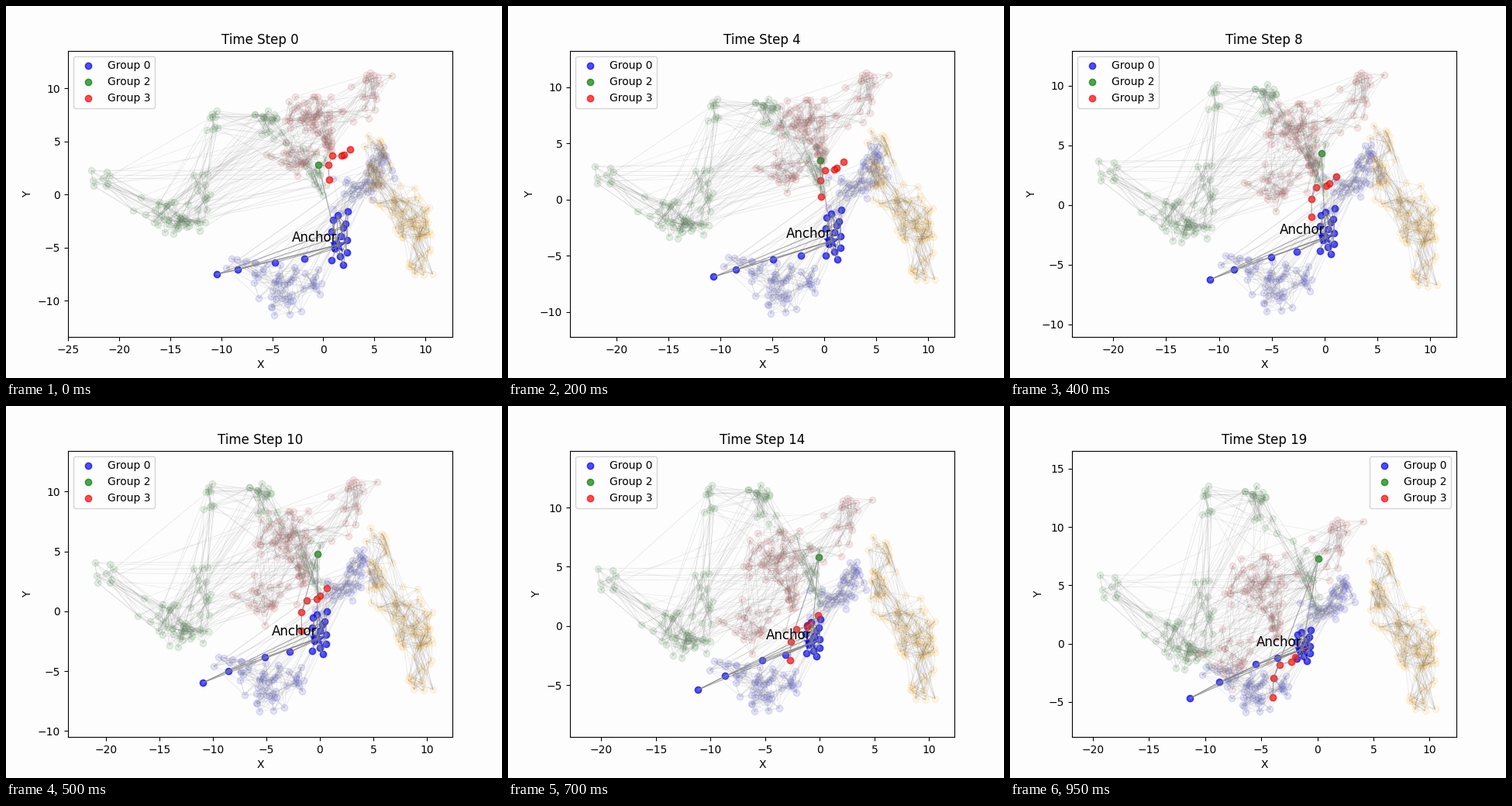
Animation of 640 by 480 pixels, one loop 1 s. Source, as a matplotlib script:

```python
import numpy as np
import matplotlib.pyplot as plt
from matplotlib.animation import FuncAnimation
from matplotlib.collections import LineCollection
from matplotlib.ticker import MultipleLocator

STEPS = 20
PAPER = "#fdfdfd"
rng = np.random.default_rng(12)


def eased(u, bend):
    """Progress from 0 to 1; a positive bend starts fast, a negative one slow."""
    return u + bend * u * (1 - u)


class Points:
    """Points that move from start to end along straight paths."""

    def __init__(self, start, end, bend):
        self.start, self.end, self.bend = np.array(start), np.array(end), bend

    def at(self, u):
        return self.start + (self.end - self.start) * eased(u, self.bend)


def cluster(x, y, sx, sy, slant, count):
    g = np.clip(rng.normal(size=(count, 2)), -1.9, 1.9)
    dx = sx * g[:, 0]
    return np.column_stack([x + dx, y + slant * dx + sy * g[:, 1]])


def cloud(clusters, flow, bend):
    """Seeded clusters carried along by a displacement field."""
    start = np.vstack([cluster(*c) for c in clusters])
    moves = np.column_stack(flow(*start.T))
    return Points(start, start + moves, bend)


def random_links(points, near=4):
    """Link each point to a few close neighbours, and every other one to a far one."""
    links = []
    for i, p in enumerate(points.start):
        order = np.argsort(((points.start - p) ** 2).sum(1))
        partners = list(rng.choice(order[1:18], near, replace=False))
        if i % 2 == 0:
            partners.append(rng.choice(order[18:]))
        links += [(i, j) for j in partners]
    return np.array(links)


# Faint clouds; clusters are x, y, spread x, spread y, slant, count.
blue = cloud(
    [(-4.3, -9.0, 1.3, 1.3, -0.2, 34), (-7.5, -6.6, 1.3, 0.5, -0.3, 12),
     (-0.8, -8.4, 0.6, 0.7, 0, 12), (5.4, 2.5, 0.8, 1.5, 0, 28),
     (3.0, 0.2, 1.2, 0.9, 0.2, 18)],
    lambda x, y: (-2.4 - 0.17 * x, 2.4 - 0.27 * y), 0.1)
orange = cloud(
    [(5.2, 2.2, 0.9, 1.6, -0.4, 36), (7.6, -2.2, 1.3, 0.9, -0.8, 38),
     (9.8, -3.6, 0.6, 1.3, -0.2, 28), (9.4, -7.0, 0.8, 0.6, 0, 10),
     (8.4, -0.1, 0.9, 0.5, 0, 8)],
    lambda x, y: (0.3 + 0.07 * y, 2.3 + 0.06 * y), 0)
green = cloud(
    [(-21.6, 1.6, 0.9, 0.7, -0.4, 8), (-15.0, -2.2, 1.9, 0.8, -0.15, 46),
     (-11.6, 0.4, 0.6, 1.0, 0, 10), (-10.6, 7.6, 0.5, 1.0, 0.5, 9),
     (-5.2, 6.7, 0.8, 0.8, -0.4, 20), (-0.9, 2.0, 0.6, 1.1, -0.5, 16)],
    lambda x, y: (0.1 - 0.155 * x - 0.12 * y, 2.8 + 0.36 * y), -0.1)
red = cloud(
    [(-0.9, 7.5, 1.5, 0.9, 0, 50), (0.0, 5.3, 0.9, 0.8, 0.3, 22),
     (-2.7, 3.3, 1.5, 0.8, -0.1, 24), (4.6, 9.4, 1.1, 1.1, 0.6, 20)],
    lambda x, y: (-4.9 + 0.13 * (x + y), -7 + 0.95 * y - 0.04 * y**2 + 0.1 * x), -0.05)

CLOUDS = [(blue, "mediumblue"), (orange, "orange"),
          (green, "darkgreen"), (red, "firebrick")]
LINKS = {points: random_links(points) for points, _ in CLOUDS}
BRIDGE = np.column_stack([rng.integers(len(green.start), size=40),
                          rng.integers(len(red.start), size=40)])

# Highlighted points.
anchor = Points([(1.4, -4.75)], [(-1.38, -0.5)], 0.25)
arm = Points([(-10.45, -7.52), (-8.4, -7.1), (-4.75, -6.4), (-1.87, -6.05)],
             [(-11.36, -4.7), (-8.73, -3.3), (-5.48, -1.77), (-3.55, -1.24)], 0.1)

i = np.arange(14)
core_start = np.column_stack([1.6 + 0.8 * np.cos(1.85 * i), np.linspace(-1.6, -6.6, 14)])
core = Points(core_start,
              anchor.end + (core_start - anchor.start) * (0.78, 0.52), 0.25)

hub = Points([(-0.5, 2.8)], [(0.1, 7.25)], -0.3)

i = np.arange(6)
chain_start = np.array([(2.62, 4.25), (2.0, 3.75), (1.8, 3.65),
                        (0.9, 3.65), (0.5, 2.8), (0.57, 1.4)])
chain = Points(chain_start,
               chain_start - np.column_stack([3.85 + 0.14 * i, 4.65 + 0.27 * i]), -0.1)

# Strong links, indexed over anchor, arm, core, hub and chain in that order.
LIT = [anchor, arm, core, hub, chain]
ARM, CORE, HUB, CHAIN = np.cumsum([len(p.start) for p in LIT])[:-1]
STRONG = [(0, j) for j in range(ARM, HUB)]
STRONG += [(ARM, ARM + 1), (ARM, CORE + 4), (ARM + 1, CORE + 6), (ARM + 3, CORE + 9)]
STRONG += [tuple(CORE + rng.choice(HUB - CORE, 2, replace=False)) for _ in range(14)]
STRONG += [(HUB, 0), (HUB, CHAIN + 4)]
STRONG += [(j, j + 1) for j in range(CHAIN, CHAIN + 5)]
STRONG = np.array(STRONG)

fig, ax = plt.subplots(figsize=(6.4, 4.8), dpi=100, facecolor=PAPER)


def add_lines(pairs, width, alpha):
    ax.add_collection(LineCollection(pairs, colors="gray", zorder=2,
                                     linewidths=width, alpha=alpha), autolim=False)


def set_limits(step, u):
    # Each upper limit follows whichever of two outer points leads.
    ax.set_xlim(-25.02 + 3.15 * eased(u, -0.27),
                max(12.65 - 0.024 * step, 10.88 + 0.08 * step))
    ax.set_ylim(-13.43 + 5.41 * eased(u, 0.06),
                max(13.55 - 0.077 * step, 9.95 + 0.347 * step))


def draw(step):
    u = step / (STEPS - 1)
    ax.clear()
    ax.set_facecolor(PAPER)

    for points, color in CLOUDS:
        now = points.at(u)
        ax.scatter(*now.T, color=color, alpha=0.1)
        add_lines(now[LINKS[points]], 0.5, 0.2)
    from_green, to_red = BRIDGE.T
    add_lines(np.stack([green.at(u)[from_green], red.at(u)[to_red]], axis=1), 0.5, 0.15)

    lit = np.vstack([p.at(u) for p in LIT])
    parts = [("Group 0", "blue", lit[ARM:HUB]), ("Group 2", "green", lit[HUB:CHAIN]),
             ("Group 3", "red", lit[CHAIN:])]
    for label, color, now in parts:
        ax.scatter(*now.T, color=color, alpha=0.7, label=label)
    ax.scatter(*lit[0], marker="*", s=200, color="blue", alpha=0.7)
    add_lines(lit[STRONG], 0.8, 0.7)
    ax.text(*lit[0], "Anchor", fontsize=12, ha="right", va="bottom")

    set_limits(step, u)
    ax.xaxis.set_major_locator(MultipleLocator(5))
    ax.yaxis.set_major_locator(MultipleLocator(5))
    ax.set_title(f"Time Step {step}")
    ax.set_xlabel("X")
    ax.set_ylabel("Y")
    ax.legend(loc="upper left" if step < 17 else "upper right", facecolor=PAPER)


anim = FuncAnimation(fig, draw, frames=STEPS, interval=1000 / STEPS, repeat=True,
                     init_func=lambda: None)
plt.show()
```
